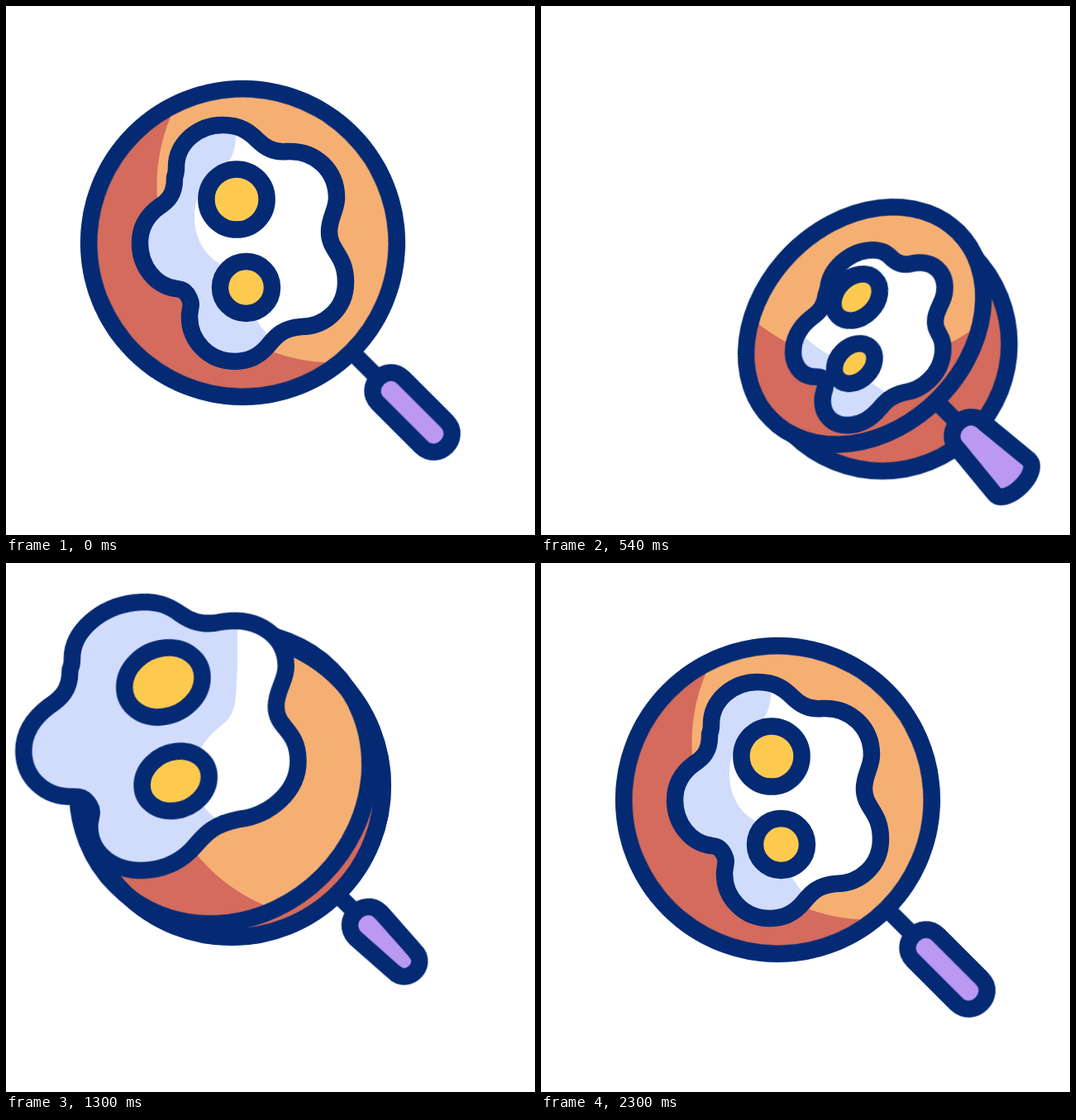
An HTML page without scripts that plays this animation: 640 by 640 pixels, repeating every 2.6 s.

```html
<!DOCTYPE html>
<html lang="en">
<head>
<meta charset="utf-8">
<title>Frying pan</title>
<style>
html, body { margin: 0; width: 100%; height: 100%; overflow: hidden; background: #fff; }
svg { display: block; width: 640px; height: 640px; }
path, circle { vector-effect: non-scaling-stroke; }
.line { stroke: #042a74; stroke-width: 20.5; stroke-linejoin: round; }

.body, .rim, .egg, .yolks, .handle {
  transform-origin: 286.5px 286.5px;
  animation: 2600ms cubic-bezier(.33, 0, .67, 1) infinite;
}
.body { animation-name: body; }
.rim { animation-name: rim; }
.egg { animation-name: egg; }
.yolks { animation-name: yolks; }
.handle { animation-name: handle; }
.wall { animation: 2600ms cubic-bezier(.33, 0, .67, 1) infinite body, 2600ms step-end infinite wall; }

/* Pan: rest, dip, rest, flick, rest */
@keyframes body {
  0%, 30.77%, 60%, 100% { transform: translate(0, 0) scale(1); }
  15.385%, 20% { transform: translate(128.5px, 124.5px) scale(.822); }
  41.54% { transform: translate(-24.5px, -30px) scale(.968); }
}
@keyframes rim {
  0%, 30.77%, 60%, 100% { transform: translate(0, 0) rotate(45deg) scale(1, 1); }
  15.385%, 20% { transform: translate(107px, 102px) rotate(45deg) scale(.667, .857); }
  41.54% { transform: translate(-41.5px, -48.3px) rotate(45deg) scale(.833, .986); }
}
@keyframes handle {
  0%, 30.77%, 60%, 100% { d: path("M591 0L640 0M658.5 -21.8L731.9 -21.8C760.9 -21.8 760.9 21.8 731.9 21.8L658.5 21.8C629.5 21.8 629.5 -21.8 658.5 -21.8Z"); }
  15.385%, 20% { d: path("M678 0L722 0M737 -22.5L807 -29.5C828 -29.5 828 29.5 807 29.5L737 22.5C707 22.5 707 -22.5 737 -22.5Z"); }
  41.54% { d: path("M545 0L575 0M589 -22L642 -15.2C662 -15.2 662 15.2 642 15.2L589 22C560 22 560 -22 589 -22Z"); }
}
@keyframes wall {
  0%, 60%, 100% { opacity: 0; }
  30.77% { opacity: 1; }
}

/* Egg: rides the pan, is tossed, hops once more and lands */
@keyframes egg {
  0%, 88.46%, 100% { transform: translate(0, 0) rotate(45deg) scale(1, 1) rotate(-45deg) skewY(0deg) scale(1, 1); }
  15.385%, 20% { transform: translate(113.5px, 114.5px) rotate(45deg) scale(.636, .843) rotate(-45deg) skewY(0deg) scale(1, 1); }
  30.77% { transform: translate(0, 0) rotate(45deg) scale(1, 1) rotate(-45deg) skewY(0deg) scale(1, 1); animation-timing-function: cubic-bezier(.4, 0, .7, .55); }
  39.23% { transform: translate(-53px, -54px) rotate(45deg) scale(1, 1) rotate(-45deg) skewY(-6deg) scale(1.165, 1); animation-timing-function: cubic-bezier(.3, .45, .6, 1); }
  47.69% { transform: translate(-104.5px, -84.5px) rotate(45deg) scale(1, 1) rotate(-45deg) skewY(-7deg) scale(1.35, 1.15); animation-timing-function: cubic-bezier(.4, 0, .7, .8); }
  58.46% { transform: translate(-34.5px, -30px) rotate(45deg) scale(1, 1) rotate(-45deg) skewY(-8deg) scale(1.14, 1); animation-timing-function: cubic-bezier(.3, .3, .6, 1); }
  82.31% { transform: translate(4.5px, -9px) rotate(45deg) scale(1, 1) rotate(-45deg) skewY(0deg) scale(1.76, 1.32); animation-timing-function: cubic-bezier(.4, 0, .8, .8); }
}
@keyframes yolks {
  0%, 88.46%, 100% { transform: translate(0, 0) rotate(45deg) scale(1, 1) rotate(-45deg) skewY(0deg) scale(1, 1); }
  15.385%, 20% { transform: translate(97px, 107px) rotate(45deg) scale(.653, .866) rotate(-45deg) skewY(0deg) scale(1, 1); }
  30.77% { transform: translate(0, 0) rotate(45deg) scale(1, 1) rotate(-45deg) skewY(0deg) scale(1, 1); animation-timing-function: cubic-bezier(.4, 0, .7, .55); }
  39.23% { transform: translate(-36.5px, -53px) rotate(45deg) scale(1, 1) rotate(-45deg) skewY(-6deg) scale(1.165, 1); animation-timing-function: cubic-bezier(.3, .45, .6, 1); }
  47.69% { transform: translate(-92px, -88px) rotate(45deg) scale(1, 1) rotate(-45deg) skewY(-7deg) scale(1.3, 1.15); animation-timing-function: cubic-bezier(.4, 0, .7, .8); }
  58.46% { transform: translate(-20px, -29.5px) rotate(45deg) scale(1, 1) rotate(-45deg) skewY(-8deg) scale(1.14, 1); animation-timing-function: cubic-bezier(.3, .3, .6, 1); }
  82.31% { transform: translate(4.5px, -9px) rotate(45deg) scale(1, 1) rotate(-45deg) skewY(0deg) scale(1.6, 1.35); animation-timing-function: cubic-bezier(.4, 0, .8, .8); }
}
</style>
</head>
<body>
<svg viewBox="0 0 640 640" xmlns="http://www.w3.org/2000/svg">
  <defs>
    <circle id="disc" cx="286.5" cy="286.5" r="186.2"/>
    <path id="white" d="M262 144C283 144 294 152 304 162C313 171 325 178 340 176C375 174 400 200 400 232C400 247 391 256 391 273C391 297 411 300 411 334C411 366 386 388 357 388C332 390 325 402 317 411C307 423 293 430 277 430C245 430 222 405 222 376C222 366 226 362 222 354C217 343 212 343 206 342C181 339 162 315 162 287C162 268 170 254 185 243C196 236 204 228 204 209C204 203 206 206 206 195C206 166 232 144 262 144Z"/>
    <clipPath id="inRim"><use href="#disc" class="rim"/></clipPath>
    <clipPath id="inEgg"><use href="#white" class="egg"/></clipPath>
  </defs>

  <use href="#disc" class="body line" fill="#d46b5d"/>
  <g transform="rotate(45)">
    <path class="handle line" fill="#bb98f2" d="M591 0L640 0M658.5 -21.8L731.9 -21.8C760.9 -21.8 760.9 21.8 731.9 21.8L658.5 21.8C629.5 21.8 629.5 -21.8 658.5 -21.8Z"/>
  </g>

  <use href="#disc" class="rim" fill="#d46b5d"/>
  <g clip-path="url(#inRim)"><circle cx="397" cy="217" r="214.5" fill="#f6af73"/></g>
  <use href="#disc" class="rim line" fill="none"/>
  <use href="#disc" class="wall body line" fill="none"/>

  <use href="#white" class="egg" fill="#d1dcfd"/>
  <g clip-path="url(#inEgg)">
    <path fill="#fff" d="M280 0V125C278 160 280 178 265 193C240 212 228 230 228 255C228 290 250 318 290 321C297 325 298 335 297 352C298 378 310 398 345 420L412 464L640 640V0Z"/>
  </g>
  <use href="#white" class="egg line" fill="none"/>
  <g class="yolks line" fill="#fdca4f">
    <circle cx="279" cy="234" r="36.6"/>
    <circle cx="290.5" cy="340.5" r="31.5"/>
  </g>
</svg>
</body>
</html>
```
